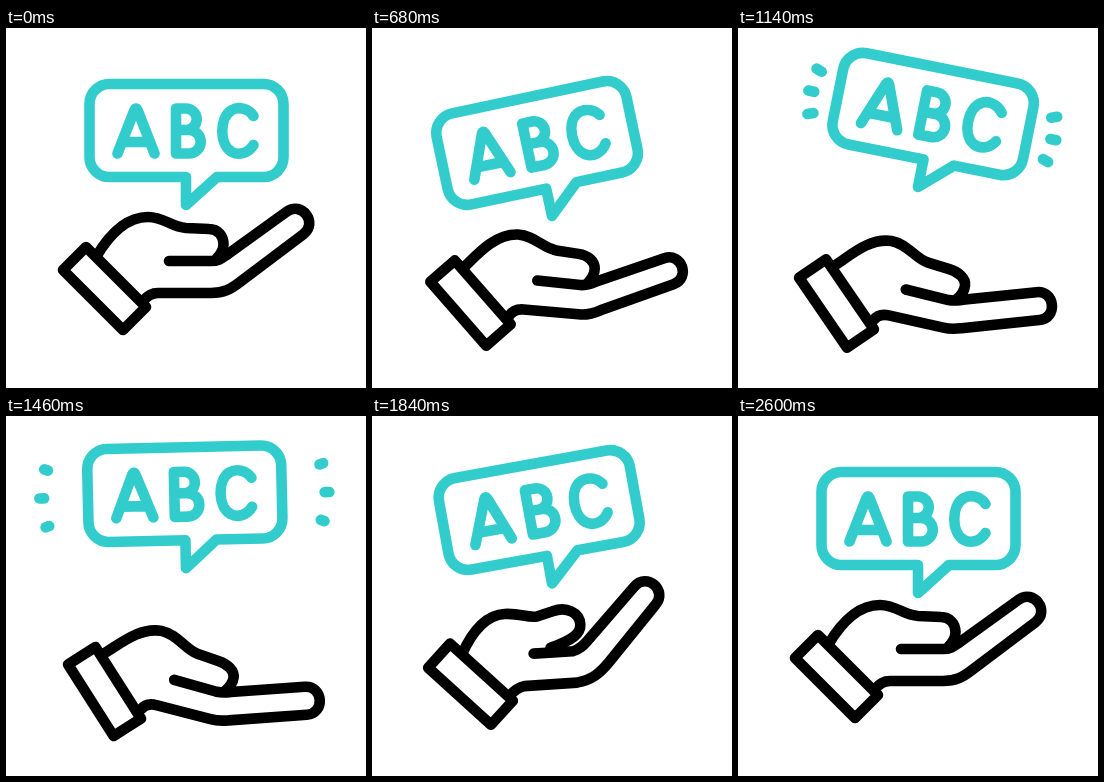
Write an HTML page that moves like this. It is 360 px wide and 360 px high and loops after 3 s.

```html
<!DOCTYPE html>
<html lang="en">
<head>
<meta charset="utf-8">
<title>Hand tossing a speech bubble</title>
<style>
  html, body { margin: 0; width: 100%; height: 100%; overflow: hidden; background: #fff; }
  svg { display: block; width: 100%; height: 100%; }
  path { stroke-width: 10.6; stroke-linecap: round; stroke-linejoin: round; }

  svg * {
    animation: 3s infinite;
    animation-timing-function: cubic-bezier(.37, 0, .63, 1);
  }

  .bubble {
    fill: none;
    stroke: #33cccc;
    transform-origin: 180px 177px;
    animation-name: toss, swing;
  }
  @keyframes toss {
    0%, 7.333% { translate: 0 0; }
    23.333% { translate: 0 11px; }
    39.333% { translate: 0 -18.5px; }
    54% { translate: 0 -27.3px; }
    69.667% { translate: 0 11.8px; }
    86.667%, 100% { translate: 0 0; }
  }
  @keyframes swing {
    0%, 7.333% { rotate: 0deg; }
    23.333% { rotate: -12deg; }
    39.333% { rotate: 11.7deg; }
    57% { rotate: -12deg; }
    74.667%, 100% { rotate: 0deg; }
  }

  .sparks path {
    stroke-dasharray: 6 80;
    stroke-dashoffset: 6.2;
    visibility: hidden;
    animation-name: shoot;
  }
  @keyframes shoot {
    0%, 33.6% { visibility: hidden; stroke-dashoffset: 6.2; }
    33.667% {
      visibility: visible;
      stroke-dashoffset: 6;
      animation-timing-function: cubic-bezier(.333, .667, .667, 1);
    }
    57.667% { visibility: visible; stroke-dashoffset: -31.5; }
    57.7%, 100% { visibility: hidden; stroke-dashoffset: -31.5; }
  }

  .hand {
    fill: #fff;
    stroke: #000;
    transform-origin: 98.5px 260.5px;
    animation-name: dip, tilt;
  }
  @keyframes dip {
    0%, 7.333% { translate: 0 0; }
    24.667%, 54% { translate: 0 15px; }
    69% { translate: 0 0; }
    100% { translate: 0 0; }
  }
  @keyframes tilt {
    0%, 7.333% { rotate: 0deg; }
    48.667% { rotate: 12.5deg; }
    66.667% { rotate: -6.5deg; }
    86.667%, 100% { rotate: 0deg; }
  }

  .thumb { animation-name: thumb; }
  @keyframes thumb {
    0%, 7.333%, 83.333%, 100% {
      d: path("M90 229C100 212 118 189 142 189C158 189 165 199 180 200L203 201C212 201 217.5 208 217.5 216C217.5 222 214 227 211 230");
    }
    32.667%, 48.667% {
      d: path("M88 225C101 214 117 190 141 189C158 189 168 202 181 203.5L203 206C213 207 221 212 221.5 219C222 225 220 229 216 234");
    }
    62% {
      d: path("M91 231C100 213 115 192 136 192C152 192 158 197 168 196L184 191.5C198 187 211 194 211 206C211 215 203 221 180 228");
    }
  }

  .finger { animation-name: finger; }
  @keyframes finger {
    0%, 7.333%, 83.333%, 100% {
      d: path("M163 233L205 233C213 233 216 230 222 226L280.6 183.8C295.6 172.6 312.4 195 297.4 206.2L234 254C225 261 218 265 205 265L152 265C147 265 141 268 137 273");
    }
    32.667%, 48.667% {
      d: path("M164 234L208 236.5C213 236.5 216 235.5 222 233.7L293 212.6C310.9 207.3 318.9 234.1 301 239.4L226 261.8C221 263.3 216 265 208 264.5L152 262.6C146 262.4 141 264 138 270");
    }
    62% {
      d: path("M163 233L202 232.5C210 231 214 226 219 221L266.9 170.4C279.8 156.8 300 176 287.1 189.6L238 245C228 256 220 262 205 264L152 265C147 266 142 269 138 273");
    }
  }
</style>
</head>
<body>
<svg viewBox="0 0 360 360" role="img" aria-label="ABC">
  <g class="bubble">
    <g class="sparks">
      <path d="M291 85L319.5 75"/>
      <path d="M294 104H325"/>
      <path d="M291 123L319.5 133"/>
      <path d="M69 85L40.5 75"/>
      <path d="M66 104H35"/>
      <path d="M69 123L40.5 133"/>
    </g>
    <path d="M180 149H103.5a20 20 0 0 1 -20 -20V76a20 20 0 0 1 20 -20H257.500a20 20 0 0 1 20 20V129a20 20 0 0 1 -20 20H211L180 177Z"/>
    <path d="M111.500 125.500L128.500 82Q130 79 131.500 82L148.500 125.500M118 114H142"/>
    <path d="M170 80.500H180a10.750 10.750 0 0 1 0 21.500H170M180 102H183a11.750 11.750 0 0 1 0 23.500H170V80.500"/>
    <path d="M247.500 88C242 80 232 78.500 226 82C213 89 213 117 226 124C232 127.500 242 126 247.500 117"/>
  </g>
  <g class="hand">
    <path class="thumb" d="M90 229C100 212 118 189 142 189C158 189 165 199 180 200L203 201C212 201 217.500 208 217.500 216C217.500 222 214 227 211 230"/>
    <path class="finger" d="M163 233L205 233C213 233 216 230 222 226L280.600 183.800C295.600 172.600 312.400 195 297.400 206.200L234 254C225 261 218 265 205 265L152 265C147 265 141 268 137 273"/>
    <path d="M57 242L80 219L140 279L117 302Z"/>
  </g>
</svg>
</body>
</html>
```
